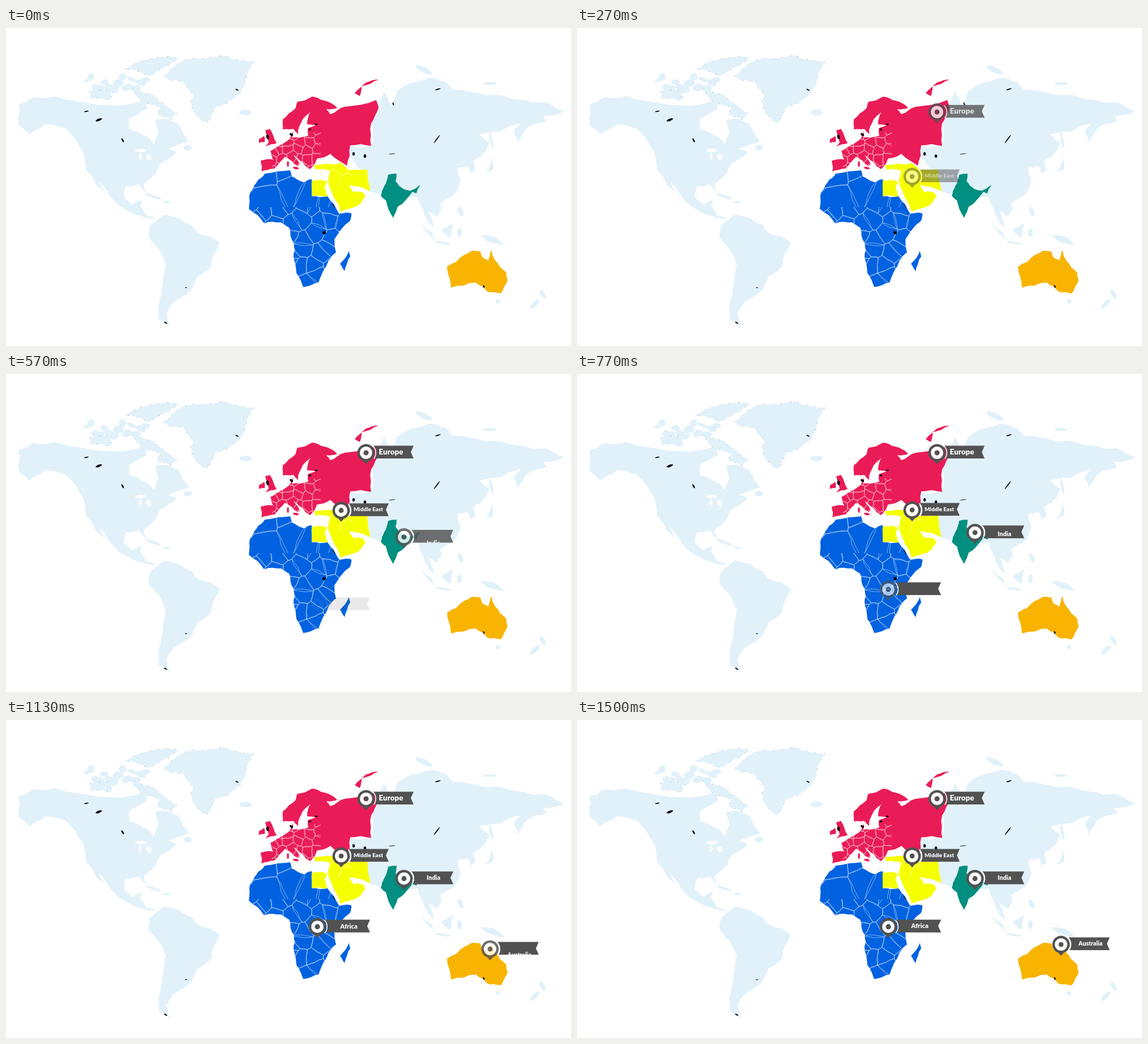
Write an HTML page with a canvas that moves like this. It is 998 px wide and 561 px high and loops after 5.01 s.

```html
<!DOCTYPE html>
<html lang="en">
<head>
<meta charset="utf-8">
<title>World regions</title>
<style>
html, body { margin: 0; width: 100%; height: 100%; overflow: hidden; background: #fff; }
canvas { display: block; width: 100vw; height: 100vh; }
</style>
</head>
<body>
<canvas id="stage" width="998" height="561"></canvas>
<script>
const W = 998, H = 561, LOOP = 5010, TAU = Math.PI * 2;
const DARK = '#525252', PALE = '#e1f1f9', RED = '#ea1c57', BLUE = '#0062e0', YELLOW = '#f6ff00';

let seed = 7;
const rnd = () => (seed = seed * 16807 % 2147483647) / 2147483647;
const jitter = size => (rnd() - .5) * size;
const clamp = v => Math.max(0, Math.min(1, v));

const sheet = document.createElement('canvas');
sheet.width = W;
sheet.height = H;
const m = sheet.getContext('2d');

// closed outline whose sides are broken up into a natural coast
function coast(flat) {
  let pts = [];
  for (let i = 0; i < flat.length; i += 2) pts.push([flat[i], flat[i + 1]]);
  for (let pass = 0; pass < 2; pass++) {
    pts = pts.flatMap(([x, y], i) => {
      const [u, v] = pts[(i + 1) % pts.length], k = jitter(.16);
      return [[x, y], [(x + u) / 2 + (v - y) * k, (y + v) / 2 - (u - x) * k]];
    });
  }
  return outline(pts);
}

function outline(pts) {
  const path = new Path2D();
  for (const p of pts) path.lineTo(...p);
  path.closePath();
  return path;
}

function land(color, flat) {
  const path = coast(flat);
  m.fillStyle = color;
  m.fill(path);
  return path;
}

function blob(color, x, y, rx, ry, tilt = 0) {
  m.fillStyle = color;
  m.beginPath();
  m.ellipse(x, y, rx, ry, tilt, 0, TAU);
  m.fill();
}

// part of a cell lying nearer to a than to b
function nearer(cell, a, b) {
  const side = ([x, y]) =>
    (x - (a[0] + b[0]) / 2) * (b[0] - a[0]) + (y - (a[1] + b[1]) / 2) * (b[1] - a[1]);
  return cell.flatMap((p, i) => {
    const q = cell[(i + 1) % cell.length], s = side(p), e = side(q), out = s <= 0 ? [p] : [];
    if (s * e < 0) out.push([0, 1].map(d => p[d] + (q[d] - p[d]) * s / (s - e)));
    return out;
  });
}

// country borders: irregular cells inside a piece of land
function borders(region, x, y, w, h, step, alpha) {
  const sites = [];
  for (let v = y; v <= y + h; v += step)
    for (let u = x; u <= x + w; u += step)
      sites.push([u + jitter(step * .8), v + jitter(step * .8)]);
  m.save();
  m.clip(region);
  m.beginPath();
  m.rect(x, y, w, h);
  m.clip();
  m.lineWidth = .6;
  m.strokeStyle = `rgba(255,255,255,${alpha})`;
  for (const a of sites) {
    let cell = [[-1, -1], [1, -1], [1, 1], [-1, 1]].map(([i, j]) => [a[0] + i * step * 2, a[1] + j * step * 2]);
    for (const b of sites) if (b !== a) cell = nearer(cell, a, b);
    m.stroke(coast(cell.flat()));
  }
  m.restore();
}

function paintAmericas() {
  land(PALE, [22,135, 48,122, 125,129, 200,137, 245,126, 249,143, 218,160, 217,178, 250,192, 261,205,
    269,184, 264,162, 278,160, 304,169, 323,200, 287,213, 301,219, 272,240, 266,254, 243,276, 247,290,
    236,276, 213,279, 208,298, 224,312, 240,303, 237,313, 247,330, 265,336, 240,332, 190,304, 165,271,
    182,300, 142,251, 136,218, 105,177, 70,170, 41,188, 22,170, 24,148]);
  land(PALE, [254,350, 280,329, 329,348, 338,361, 377,378, 363,419, 338,438, 326,463, 297,483,
    283,503, 290,528, 270,514, 282,416, 252,370]);
  const north = [
    land(PALE, [279,85, 312,58, 385,48, 438,60, 426,80, 412,116, 370,139, 355,168, 335,153, 326,129,
      331,119, 313,95, 290,93]),
    land(PALE, [211,73, 262,53, 306,54, 266,77, 250,85]),
    land(PALE, [147,111, 183,109, 186,127, 150,124]),
    land(PALE, [222,108, 260,118, 302,151, 292,162, 268,154, 272,140, 230,120])
  ];
  for (let i = 0; i < 14; i++)
    blob(PALE, 142 + i * 8, 98 + jitter(28), 5 + rnd() * 5, 3 + rnd() * 4, jitter(1));
  m.setLineDash([1.5, 16, 2, 11]);
  m.lineWidth = .8;
  m.strokeStyle = 'rgba(60,70,95,.55)';
  for (const path of north) m.stroke(path);
  m.setLineDash([]);
  blob(PALE, 423, 149, 11, 5);
  blob(PALE, 260, 297, 15, 2.5, .35);
  blob(PALE, 284, 307, 7, 2);
  blob(PALE, 321, 211, 7, 5);
  blob('#fff', 238, 216, 10, 3);
  blob('#fff', 237, 227, 2.4, 6);
  blob('#fff', 252, 228, 4, 6, -.5);
}

function paintAsia() {
  land(PALE, [657,132, 668,111, 680,136, 691,111, 747,88, 777,95, 790,109, 849,119, 905,126, 954,131,
    986,147, 949,155, 955,164, 918,178, 904,203, 897,183, 908,168, 836,188, 854,203, 848,217, 825,235,
    829,252, 820,257, 816,244, 798,247, 803,270, 792,293, 767,309, 769,322, 761,333, 746,323, 756,352,
    739,330, 727,297, 690,300, 642,288, 638,262, 605,225, 605,208, 645,208, 645,165]);
  land(PALE, [858,228, 860,250, 830,264, 852,250]);
  land(PALE, [731,342, 752,360, 758,376]);
  land(PALE, [769,356, 790,344, 785,370]);
  land(PALE, [837,366, 858,367, 881,383, 850,376]);
  blob(PALE, 738, 74, 16, 5, .45);
  blob(PALE, 855, 98, 12, 2.5);
  blob(PALE, 857, 198, 2.5, 14, -.2);
  blob(PALE, 772, 379, 14, 2, .15);
  blob(PALE, 801, 361, 4, 8);
  blob(PALE, 803, 324, 4, 9, -.4);
  blob(PALE, 948, 470, 4, 9, -.5);
  blob(PALE, 934, 487, 4, 11, .8);
  blob(PALE, 869, 482, 4, 3.5);
  land('#008f80', [675,259, 690,257, 688,270, 702,284, 714,287, 732,277, 725,292, 718,289, 692,315,
    684,335, 671,304, 662,296, 668,279]);
  land('#f8b400', [779,421, 797,411, 823,393, 838,394, 841,404, 852,410, 857,392, 864,410, 884,432,
    886,445, 874,468, 850,465, 830,449, 786,458]);
}

function paintEurope() {
  const main = land(RED, [450,234, 472,232, 467,217, 491,203, 502,194, 507,181, 506,193, 534,190,
    533,177, 552,171, 532,170, 538,148, 524,161, 516,187, 507,178, 489,179, 489,161, 511,142, 515,130,
    541,121, 562,128, 585,141, 566,143, 573,152, 598,139, 654,127, 658,141, 645,168, 645,208, 608,207,
    602,243, 573,222, 550,230, 546,238, 537,249, 523,236, 508,224, 519,240, 515,244, 493,227, 474,248,
    451,253]);
  borders(main, 470, 184, 86, 64, 16, .85);
  land(RED, [458,180, 466,178, 478,203, 458,209, 464,202]);
  land(RED, [447,196, 456,190, 457,201, 447,203]);
  land(RED, [658,91, 628,103, 625,120, 616,115, 636,96]);
  blob(RED, 512, 247, 5, 2, .2);
  blob(RED, 498, 240, 1.8, 5);
}

function paintSouth() {
  const africa = land(BLUE, [457,257, 502,251, 505,262, 526,272, 540,267, 540,297, 568,297, 588,327,
    610,327, 607,341, 580,373, 583,396, 570,410, 552,449, 525,457, 508,405, 508,379, 500,352, 486,343,
    456,345, 429,319, 431,290, 446,267]);
  borders(africa, 425, 250, 190, 66, 36, .85);
  borders(africa, 425, 316, 190, 142, 25, .85);
  land(BLUE, [606,393, 608,403, 598,429, 590,416]);
  land(YELLOW, [540,269, 567,271, 563,280, 568,297, 540,297]);
  const east = land(YELLOW, [544,242, 592,238, 606,251, 638,250, 643,288, 606,277, 613,289, 630,290,
    635,297, 626,310, 591,324, 568,273, 572,252, 547,250]);
  borders(east, 566, 248, 46, 30, 20, .6);
}

function paintLakes() {
  const ink = '#0a0a14';
  blob(ink, 164, 162, 6, 2, -.35);
  blob(ink, 142, 147, 4, 1, -.2);
  blob(ink, 206, 198, 1.4, 4, -.5);
  blob(ink, 761, 196, 1, 9, .65);
  blob(ink, 614, 222, 2.2, 3);
  blob(ink, 634, 226, 2.3, 3);
  blob(ink, 682, 222, 6, .6, -.1);
  blob(ink, 763, 108, 5, 1, -.3);
  blob(ink, 684, 134, 1, 3, -.3);
  blob(ink, 562, 361, 3, 3);
  blob(ink, 462, 192, 2.4, 4, -.2);
  blob(ink, 537, 179, 2.2, 1.8);
  blob(ink, 548, 170, 2.8, 1.2);
  blob(ink, 504, 188, 3.4, 2, .6);
  blob(ink, 844, 456, 1.2, 2.6, -.4);
  blob(ink, 579, 314, .7, 4, -.5);
  blob(ink, 318, 458, 2, .7);
  blob(ink, 282, 520, 3, 1.2, .5);
  blob(ink, 408, 109, 3, 1.2, .4);
}

const label = (text, x, y, right, tx, size, start, late, solid = 1) =>
  ({ text, x, y, right, tx, size, start, late, solid, top: y - 12.5, bottom: y + 10 });

const labels = [
  label('Europe', 636, 139, 720, 680, 13.4, -8),
  label('Middle East', 592, 240, 676, 640, 9.8, 120),
  label('India', 703, 279.7, 790, 755, 10.8, 273, true),
  label('Africa', 550, 364.7, 643, 605.5, 11.3, 560, true, 3),
  label('Australia', 855, 396, 941, 907, 10.5, 837, true, 3)
];

// share of the way still to go, slowing down towards the end
const left = (t, start, span) => (1 - clamp((t - start) / span)) ** 2;

function drawRibbon(g, l) {
  const r = 18, notch = l.right - 5;
  g.fillStyle = DARK;
  g.beginPath();
  g.arc(l.x, l.y, r, Math.asin((l.bottom - l.y) / r), Math.asin((l.top - l.y) / r), true);
  g.lineTo(l.right, l.top);
  g.lineTo(notch, (l.top + l.bottom) / 2);
  g.lineTo(l.right, l.bottom);
  g.fill();
  g.strokeStyle = '#fff';
  g.lineWidth = 1.6;
  g.beginPath();
  g.arc(l.x, l.y, 17.2, -.75, .65);
  g.stroke();
}

function drawPin(g, { x, y }) {
  const ring = r => { g.moveTo(x + r, y); g.arc(x, y, r, 0, TAU); };
  const band = () => { ring(10.8); ring(4.6); g.fill('evenodd'); };
  g.fillStyle = DARK;
  g.beginPath();
  g.arc(x, y, 15.4, 1.9, 1.24 + TAU);
  g.lineTo(x, y + 20);
  g.closePath();
  band();
  g.fillStyle = '#fff';
  g.beginPath();
  band();
}

function drawLabel(g, l, t) {
  const gap = left(t, l.start, 515), alpha = 1 - gap;
  if (alpha <= 0) return;
  g.save();
  g.translate(0, 44 * gap);
  g.globalAlpha = Math.min(1, alpha * l.solid);
  drawRibbon(g, l);
  g.globalAlpha = alpha;
  drawPin(g, l);

  // later captions climb into the ribbon from below its edge
  let ty = l.y - 1.2;
  if (l.late) {
    const rest = left(t, l.start + 201, 455);
    ty += 32 * rest - 44 * gap;
    g.globalAlpha = Math.min(1, 2.5 * (1 - rest));
    g.beginPath();
    g.rect(l.x, l.top, l.right - l.x, l.bottom - l.top);
    g.clip();
  }
  g.fillStyle = '#fff';
  g.font = `900 ${l.size}px Lato, "Open Sans", sans-serif`;
  g.textAlign = 'center';
  g.textBaseline = 'middle';
  g.fillText(l.text, l.tx, ty);
  g.restore();
}

m.fillStyle = '#fff';
m.fillRect(0, 0, W, H);
paintAmericas();
paintAsia();
paintEurope();
paintSouth();
paintLakes();

const stage = document.getElementById('stage').getContext('2d');
const begin = performance.now();

function frame() {
  const t = (performance.now() - begin) % LOOP;
  stage.drawImage(sheet, 0, 0);
  if (t >= 30) for (const l of labels) drawLabel(stage, l, t);
  requestAnimationFrame(frame);
}
frame();
</script>
</body>
</html>
```
